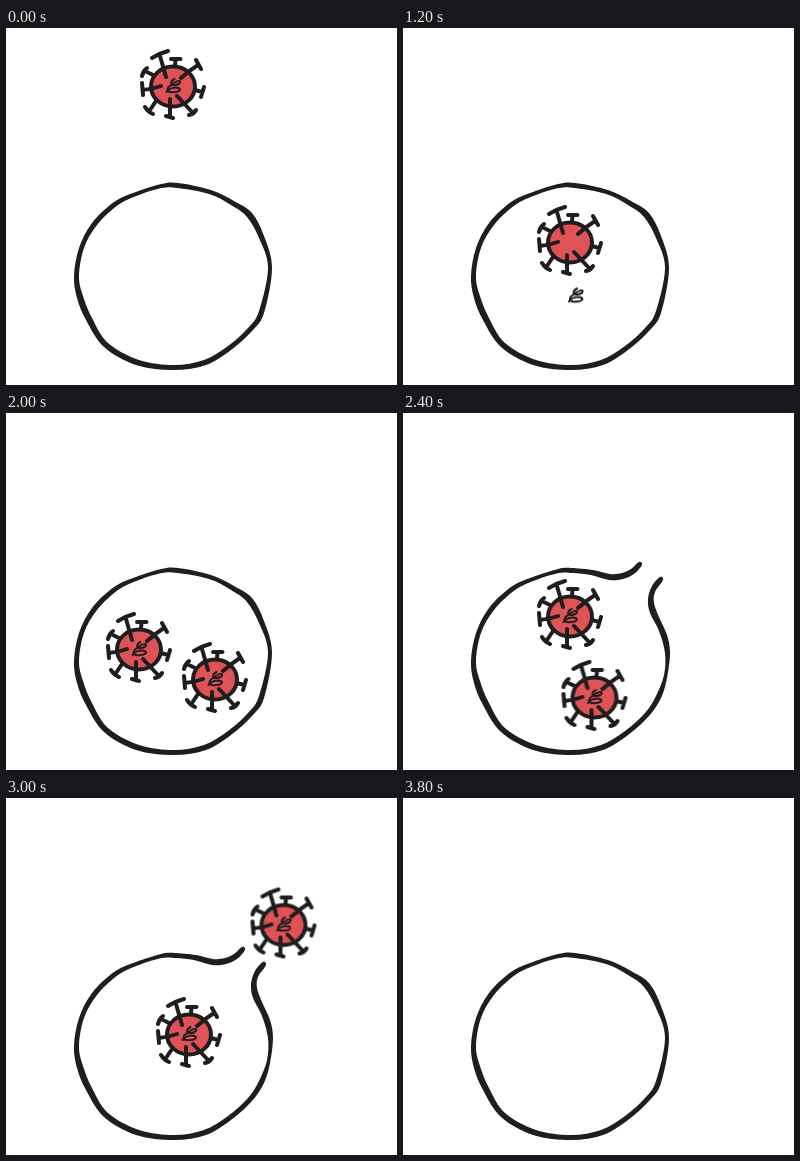
An HTML page that plays this animation: 391 px wide and 357 px high, repeating every 4000 ms.

```html
<!DOCTYPE html>
<html lang="en">
<head>
<meta charset="utf-8">
<title>Virus replication cycle</title>
<style>
  html, body { margin: 0; width: 100%; height: 100%; overflow: hidden; background: #fff; }
  svg { display: block; width: 391px; height: 357px; }
  .ink { fill: none; stroke: #1f1d1e; stroke-linecap: round; stroke-linejoin: round; }
  .cell { fill: #1f1d1e; fill-rule: evenodd; }

  /* every pose is held, then swapped */
  .anim { animation: 4s step-end infinite; }
  #closed { animation-name: closed; }
  #open { animation-name: open; }
  #first { animation-name: first; }
  #second { animation-name: second; }
  #firstCore { animation-name: first-core; }
  #secondCore { animation-name: second-core; }
  #strand { animation-name: strand; }
  #firstCurl { animation-name: first-curl; }
  #secondCurl { animation-name: second-curl; }

  @keyframes closed {
    0%, 95%, 100% { visibility: visible; }
    55% { visibility: hidden; }
  }
  @keyframes open {
    0%, 95%, 100% { visibility: hidden; }
    55% { visibility: visible; }
  }
  @keyframes first {
    0% { transform: translate(0, 0); opacity: 1; }
    5% { transform: translate(0, 30.5px); }
    15% { transform: translate(0, 62.5px); }
    20% { transform: translate(0, 98px); }
    25% { transform: translate(0, 113px); }
    30% { transform: translate(0, 156px); }
    35% { transform: translate(-34px, 175px); }
    45% { transform: translate(-34px, 178px); }
    55% { transform: translate(-28px, 160px); }
    60% { transform: translate(0, 145px); }
    65% { transform: translate(43px, 147px); }
    70% { transform: translate(74px, 109px); }
    75% { transform: translate(110.5px, 68.5px); }
    80% { transform: translate(125px, 22px); }
    85% { transform: translate(124px, 8px); }
    90% { transform: translate(128px, -9px); opacity: 1; }
    95%, 100% { transform: translate(128px, -9px); opacity: 0; }
  }
  @keyframes second {
    0% { transform: translate(42px, 180px); opacity: 0; }
    40% { transform: translate(42px, 180px); opacity: 1; }
    50% { transform: translate(42px, 208px); }
    55% { transform: translate(42px, 216px); }
    60% { transform: translate(24.5px, 226px); }
    65% { transform: translate(-14px, 226px); }
    70% { transform: translate(-13px, 205px); }
    75% { transform: translate(16px, 178px); }
    80% { transform: translate(55px, 134px); }
    85% { transform: translate(74px, 92px); }
    90% { transform: translate(105px, 62px); opacity: 1; }
    95%, 100% { transform: translate(105px, 62px); opacity: 0; }
  }
  @keyframes first-core {
    0%, 45%, 100% { visibility: visible; }
    10% { visibility: hidden; }
  }
  @keyframes second-core {
    0% { visibility: hidden; }
    50%, 100% { visibility: visible; }
  }
  @keyframes strand {
    0% { transform: translate(0, -36px); visibility: hidden; }
    10% { transform: translate(0, -36px); visibility: visible; }
    15% { transform: translate(0, 0); visibility: visible; }
    20% { transform: translate(0, 35px); visibility: visible; }
    25%, 100% { transform: translate(0, 35px); visibility: hidden; }
  }
  @keyframes first-curl {
    0% { transform: translate(173px, 224.5px); visibility: hidden; }
    25% { transform: translate(173px, 224.5px); visibility: visible; }
    30% { transform: translate(173px, 267.5px); visibility: visible; }
    35% { transform: translate(139px, 291.5px); visibility: visible; }
    45%, 100% { transform: translate(139px, 291.5px); visibility: hidden; }
  }
  @keyframes second-curl {
    0% { transform: translate(215px, 295.5px); visibility: hidden; }
    40% { transform: translate(215px, 295.5px); visibility: visible; }
    50%, 100% { transform: translate(215px, 295.5px); visibility: hidden; }
  }
</style>
</head>
<body>
<svg viewBox="0 0 391 357">
  <defs>
    <g id="virus">
      <ellipse cx="167" cy="58.5" rx="22" ry="20" fill="#df5357" stroke="#1f1d1e" stroke-width="4"/>
      <path class="ink" stroke-width="4" d="
        M146 30 Q154 25 162 23 M154 28 L160 49
        M165 31 L174.5 31 M169.5 31 L169 38
        M190 32 L195 41 M192 37 Q184 42 175 50
        M198 59 L195 69 M196 64 L189 62
        M190 82 Q188 86 183 87 M186 84 L171 68
        M160 88 L167 90 M164 89 L164 71
        M139 79 Q142 84 147 86 M144 82 L150 73
        M136 55 L137 67 M137 62 Q147 61 155 58
        M141 40 Q137 43 136 48 M139 43 L147 47"/>
    </g>
    <path id="curl" class="ink" stroke-width="2" d="M1 -7 C-3 -5 -4 -1 1 -1 C5 -1 8 -4 6 -5
      C3 -6 -1 -2 -5 1 C-8 5 -4 7 1 6 C6 6 8 3 5 2 C1 1 -5 2 -7 6"/>
  </defs>

  <path id="closed" class="cell anim"/>
  <path id="open" class="cell anim"/>

  <g id="second" class="anim">
    <use href="#virus"/>
    <g id="secondCore" class="anim"><use href="#curl" x="167.5" y="58"/></g>
  </g>
  <g id="first" class="anim">
    <use href="#virus"/>
    <g id="firstCore" class="anim"><use href="#curl" x="167.5" y="58"/></g>
  </g>

  <path id="strand" class="ink anim" stroke-width="2" d="M169 143 Q171 148 168.5 153
    C170 149 179 150 179 154 C179 158 170 158 168.5 155
    M178 159 C174 156 168 158 168 162 C169 166 178 166 178 161 C178 158 172 157 170 163
    Q171 177 170 190"/>
  <g id="firstCurl" class="anim"><use href="#curl"/></g>
  <g id="secondCurl" class="anim"><use href="#curl"/></g>
</svg>
<script>
  const points = text => text.split(" ").map(p => p.split(",").map(Number));

  // closed Catmull-Rom curve through the points
  function loop(pts) {
    const n = pts.length;
    const at = i => pts[(i + n) % n];
    let d = "M" + pts[0];
    for (let i = 0; i < n; i++) {
      const [a, b, c, e] = [at(i - 1), at(i), at(i + 1), at(i + 2)];
      const c1 = b.map((v, k) => v + (c[k] - a[k]) / 6);
      const c2 = c.map((v, k) => v - (e[k] - b[k]) / 6);
      d += `C${c1} ${c2} ${c}`;
    }
    return d + "Z";
  }

  // wall shared by both cell shapes: lower right, round to the upper left
  const outer = points("258,285 246,303 225,322 200,337 168,342 130,337 98,319 80,292 71,270 68,248 73,220 86,195 108,174 130,164 155,156");
  const inner = points("253,283 242,300 222,318 198,332 168,337 133,332 102,315 86,290 77,268 73,248 78,220 91,197 112,177 133,167 156,160");

  const outerCap = points("172,155 205,162 228,173 246,185 258,208 266,240");
  const innerCap = points("172,160 203,166 225,177 241,189 253,210 262,240");

  const leftLip = points("168,155 190,157 207,161 219,160 228,156 236,149 239,152 231,161 220,166 206,167 188,162 170,160");
  const rightLip = points("261,262 262,240 256,218 247,200 245,186 249,173 257,164 260,167 252,179 251,190 256,204 264,222 267,240 264,265");

  const draw = (id, d) => document.getElementById(id).setAttribute("d", d);
  draw("closed", loop([...outer, ...outerCap]) + loop([...inner, ...innerCap]));
  draw("open", loop([...outer, ...leftLip, ...[...inner].reverse(), ...rightLip]));
</script>
</body>
</html>
```
